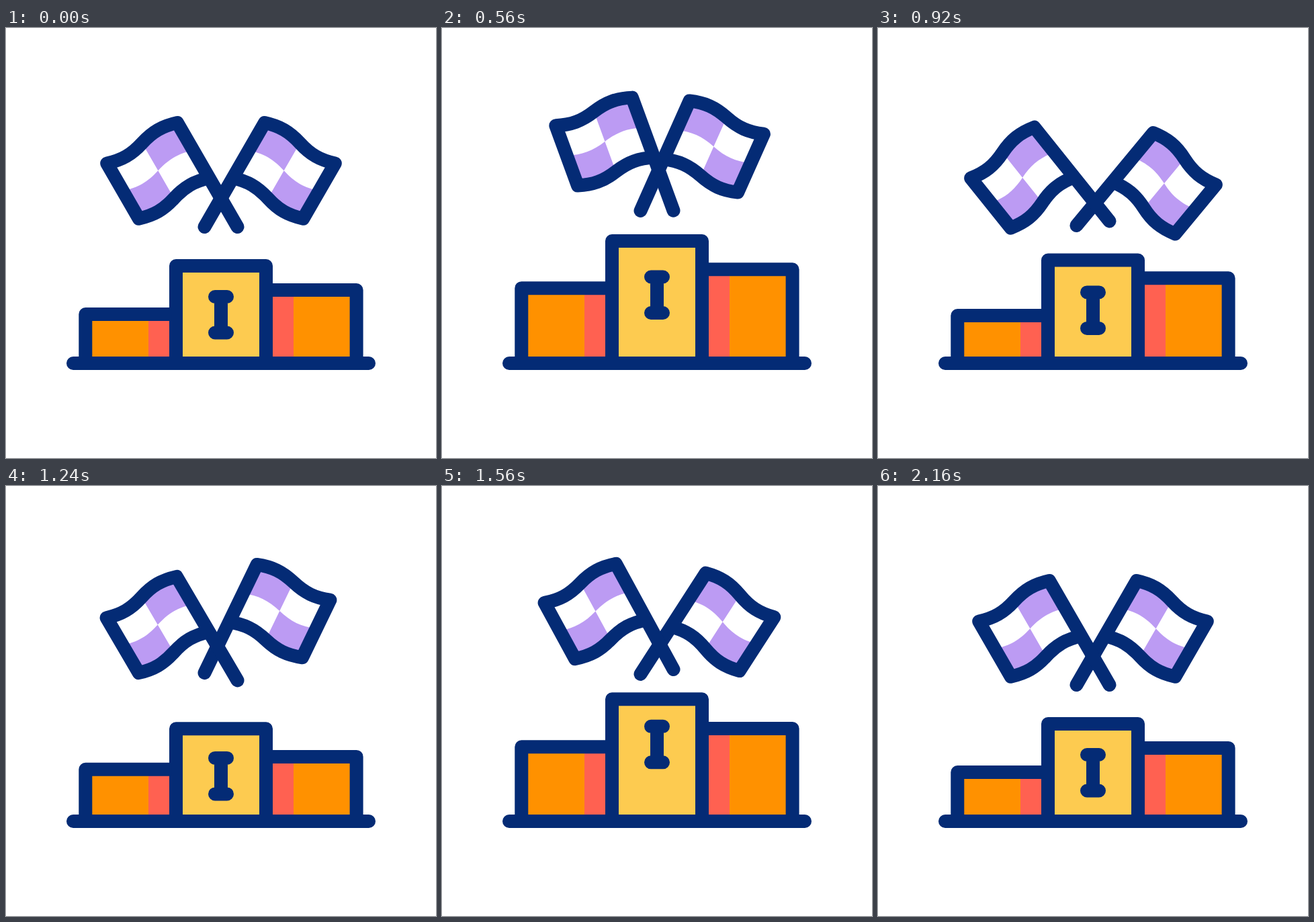
Recreate the animation shown at these times as an HTML page. Size 640 by 640 pixels, loop 2640 ms.

```html
<!DOCTYPE html>
<html lang="en">
<head>
<meta charset="utf-8">
<title>Winners' podium</title>
<style>
  html, body { margin: 0; width: 100%; height: 100%; overflow: hidden; background: #fff; }
  svg { display: block; width: 100vw; height: 100vh; }
  .line { fill: none; stroke: #042b75; stroke-width: 20; stroke-linecap: round; stroke-linejoin: round; }
  .purple { fill: #bc9bf3; }
  .orange { fill: #ff9100; }
  .coral { fill: #ff6151; }
  .yellow { fill: #fdcb50; }
</style>
</head>
<body>
<svg viewBox="0 0 640 640">
  <defs>
    <clipPath id="floor"><path d="M0 0H640V499H0Z"/></clipPath>
    <!-- Upright flag, origin at the foot of the pole -->
    <g id="flag">
      <path fill="#fff" d="M0-179c22-7 38.5-7 60.5 0s38.5 7 60.5 0v95c-22 7-38.5 7-60.5 0s-38.5-7-60.5 0z"/>
      <path class="purple" d="M0-179c22-7 38.5-7 60.5 0v47.5c-22-7-38.5-7-60.5 0z"/>
      <path class="purple" d="M60.5-131.5c22 7 38.5 7 60.5 0v47.5c-22 7-38.5 7-60.5 0z"/>
      <path class="line" d="M0 0V-179c22-7 38.5-7 60.5 0s38.5 7 60.5 0v95c-22 7-38.5 7-60.5 0s-38.5-7-60.5 0"/>
    </g>
  </defs>

  <use id="flagRight" href="#flag"/>
  <use id="flagLeft" href="#flag"/>

  <g clip-path="url(#floor)">
    <g id="stepLeft">
      <path class="orange" d="M118 426H212V600H118Z"/>
      <path class="coral" d="M212 426H253V600H212Z"/>
      <path class="line" d="M118.3 600V426H253"/>
    </g>
    <g id="stepRight">
      <path class="coral" d="M387 390H428V600H387Z"/>
      <path class="orange" d="M428 390H521V600H428Z"/>
      <path class="line" d="M521.6 600V390H387"/>
    </g>
    <g id="stepMid">
      <path class="yellow" d="M263 354H377V600H263Z"/>
      <path class="line" d="M253 600V354H387V600"/>
    </g>
  </g>
  <path id="digit" class="line" d="M311 400H329M320 400V453.5M311 453.5H329"/>
  <path class="line" d="M100 499H540"/>
</svg>
<script>
  const LOOP = 2640, STEP = 40;
  const STEP_LAG = 87, FLAG_LAG = 110;

  // Turning points in ms, shared by all parts of a kind
  const bounce = [0, 510, 1080, 1505, 2000];
  const hop = [0, 500, 1010, 1365, 1850];
  const sway = [0, 430, 880, 1300, 1670, 1990];

  const smooth = u => u * u * (3 - 2 * u);

  // Eases from pose to pose, resting before the first and after the last
  function ease(beats, poses, t) {
    const next = beats.findIndex(beat => beat > t);
    if (next < 0) return poses[poses.length - 1];
    if (next === 0) return poses[0];
    const start = beats[next - 1], from = poses[next - 1];
    return from + (poses[next] - from) * smooth((t - start) / (beats[next] - start));
  }

  function place(id, transform) {
    document.getElementById(id).setAttribute("transform", transform);
  }

  function moveStep(id, t, up, down, upAgain) {
    place(id, `translate(0 ${ease(bounce, [0, up, down, upAgain, 0], t)})`);
  }

  function moveFlag(id, t, x, side) {
    const lift = ease(hop, [0, -25, 0, -25, 0], t);
    const tilt = ease(sway, [30, 20, 40, 25, 35, 30], t);
    place(id, `translate(${x} ${296 + lift}) scale(${side} 1) rotate(${tilt})`);
  }

  function draw() {
    const t = Math.floor(performance.now() % LOOP / STEP) * STEP;
    moveStep("stepLeft", t, -40, 12, -39);
    moveStep("stepMid", t - STEP_LAG, -37.5, 11, -37.5);
    moveStep("digit", t - STEP_LAG, -30, 9, -43);
    moveStep("stepRight", t - 2 * STEP_LAG, -36, 13, -39);
    moveFlag("flagRight", t, 295.5, 1);
    moveFlag("flagLeft", t - FLAG_LAG, 344.5, -1);
    requestAnimationFrame(draw);
  }
  draw();
</script>
</body>
</html>
```
